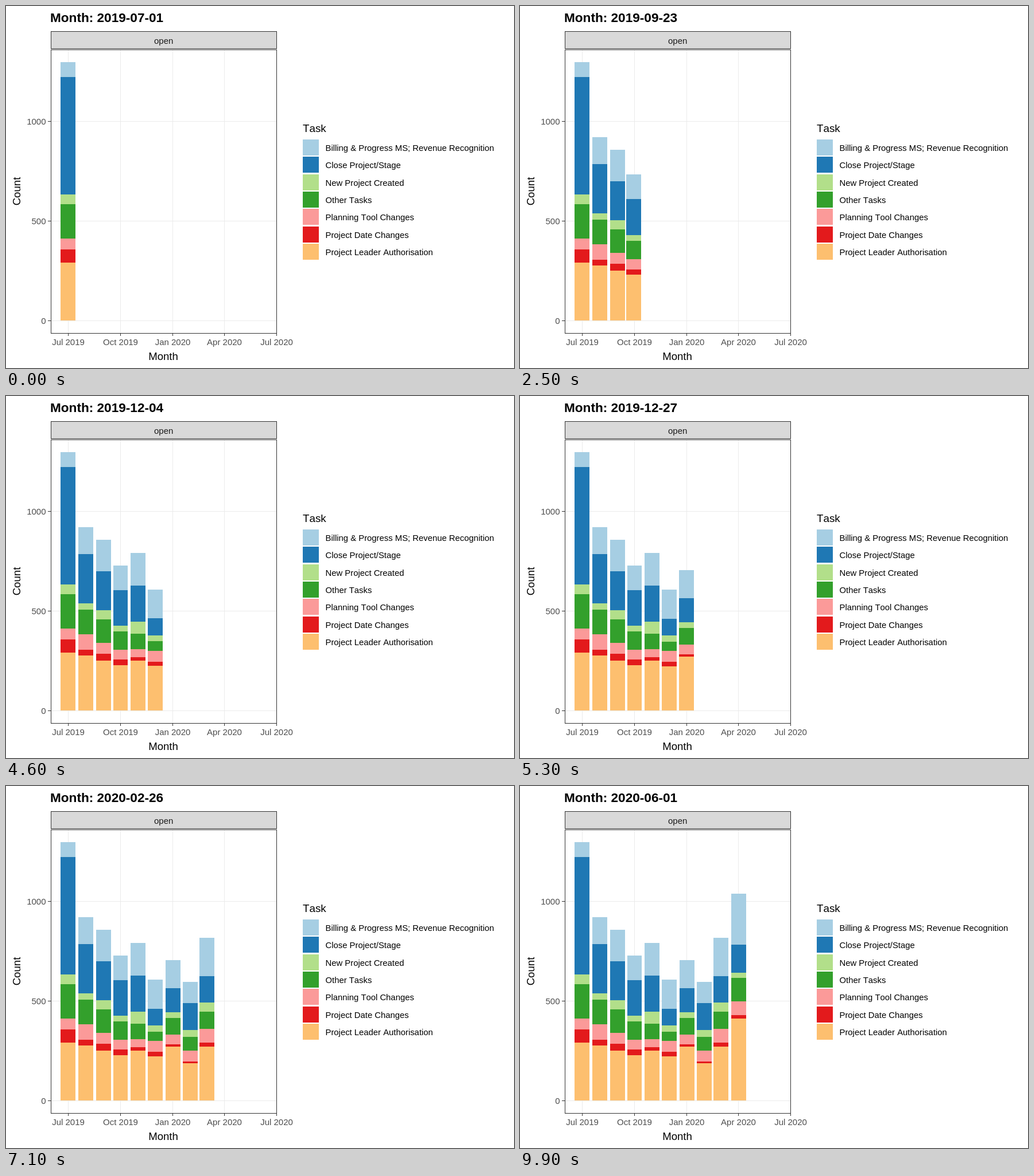
An HTML page with a canvas that plays this animation: 885 px wide and 632 px high, repeating every 10 s.

```html
<!DOCTYPE html>
<html lang="en">
<head>
<meta charset="utf-8">
<title>Open tasks by month</title>
<style>
html, body { margin: 0; width: 885px; height: 632px; overflow: hidden; background: #fff; }
canvas { display: block; }
</style>
</head>
<body>
<canvas id="stage" width="885" height="632"></canvas>
<script>
const ctx = document.getElementById('stage').getContext('2d');
const DAY = 864e5, START = Date.UTC(2019, 6, 1), SPAN = 336, FRAMES = 100;
const BASE = 549, BAR_LEFT = 95.49, BAR_WIDTH = 25.85, DAY_PX = 0.99;

// Tasks from the bottom of the stack to the top
const tasks = [
  ['Project Leader Authorisation', '#fdbf6f'],
  ['Project Date Changes', '#e31a1c'],
  ['Planning Tool Changes', '#fb9a99'],
  ['Other Tasks', '#33a02c'],
  ['New Project Created', '#b2df8a'],
  ['Close Project/Stage', '#1f78b4'],
  ['Billing & Progress MS; Revenue Recognition', '#a6cee3'],
];

// Top edge of each stacked segment, one row per month
const empty = Array(7).fill(BASE);
const months = [
  [447.5, 424.5, 406, 345.5, 328.5, 124, 98],
  [453, 443, 415.5, 373, 362, 275.5, 228.5],
  [461.5, 449.5, 431, 389.5, 374, 305.5, 251],
  [469.5, 460, 443, 410.5, 401, 338.5, 295.5],
  [462, 455.5, 441.5, 414.5, 394, 330.5, 274],
  [471.5, 464, 445, 428.5, 418, 388.5, 338],
  [455, 450.5, 433.5, 404.5, 394.5, 352.5, 304],
  [483.5, 480.5, 462, 437.5, 426, 379, 341.5],
  [454.5, 448, 424, 393.5, 377.5, 332, 264.5],
  [405.5, 400, 375.5, 335, 326, 276.5, 187.5],
  empty,
  empty,
].map((tops, i) => {
  const day = (Date.UTC(2019, 6 + i, 1) - START) / DAY;
  return { tops, x: BAR_LEFT + day * DAY_PX, key: Math.round(day * (FRAMES - 1) / SPAN) };
});

const mix = (a, b, p) => a + (b - a) * p;
const ease = p => p < 0.5 ? 4 * p ** 3 : 1 - 4 * (1 - p) ** 3;

function rect(x, y, w, h, color) {
  ctx.fillStyle = color;
  ctx.fillRect(x, y, w, h);
}

function outline(x, y, w, h) {
  ctx.strokeStyle = '#333';
  ctx.strokeRect(x + 0.5, y + 0.5, w, h);
}

function text(str, x, y, size, color = '#000', align = 'left', weight = '') {
  ctx.font = `${weight} ${size}px "Liberation Sans", Arial, sans-serif`;
  ctx.textAlign = align;
  ctx.fillStyle = color;
  ctx.fillText(str, x, y);
}

function bar({ x, tops }) {
  const left = Math.round(x), width = Math.round(x + BAR_WIDTH) - left;
  let bottom = BASE;
  tops.forEach((t, i) => {
    const top = Math.round(t);
    rect(left, top, width, bottom - top, tasks[i][1]);
    bottom = top;
  });
}

function axes() {
  rect(78, 44, 394, 31, '#d9d9d9');
  outline(78, 44, 393, 30);
  text('open', 274.7, 66, 15, '#1a1a1a', 'center');

  [[0, 549], [500, 375], [1000, 201]].forEach(([n, y]) => {
    rect(79, y, 392, 1, '#ebebeb');
    rect(73, y, 5, 1, '#333');
    text(n, 69.5, y + 6, 15, '#4d4d4d', 'right');
  });
  [['Jul 2019', 108], ['Oct 2019', 199], ['Jan 2020', 290], ['Apr 2020', 380], ['Jul 2020', 471]].forEach(([label, x]) => {
    rect(x, 76, 1, 495, '#ebebeb');
    rect(x, 572, 1, 4, '#333');
    text(label, x + 0.5, 592, 15, '#4d4d4d', 'center');
  });

  text('Month', 274, 618, 18.6, '#000', 'center');
  ctx.save();
  ctx.translate(25, 323.5);
  ctx.rotate(-Math.PI / 2);
  text('Count', 0, 0, 18.6, '#000', 'center');
  ctx.restore();
}

function legend() {
  text('Task', 517, 220, 18.8);
  tasks.forEach(([label, color], i) => {
    const y = Math.round(232.8 + (6 - i) * 30.38);
    rect(517, y, 28, 28, color);
    text(label, 556.5, y + 20, 14.85);
  });
}

function draw(now) {
  const frame = Math.floor(now / 100) % FRAMES;
  rect(0, 0, 885, 632, '#fff');
  ctx.fontKerning = 'none';

  const date = new Date(START + Math.floor(frame * SPAN / (FRAMES - 1)) * DAY);
  text('Month: ' + date.toISOString().slice(0, 10), 77, 28, 22.6, '#000', 'left', 'bold');
  axes();

  // Reached months stay; one more bar glides over them to the next month
  const past = months.filter(m => m.key <= frame);
  past.forEach(bar);
  const from = past[past.length - 1], to = months[past.length];
  if (to) {
    const p = ease((frame - from.key) / (to.key - from.key));
    bar({ x: mix(from.x, to.x, p), tops: from.tops.map((t, i) => mix(t, to.tops[i], p)) });
  }

  outline(78, 76, 393, 495);
  legend();
}

const begin = performance.now();
(function loop() {
  draw(performance.now() - begin);
  requestAnimationFrame(loop);
})();
</script>
</body>
</html>
```
